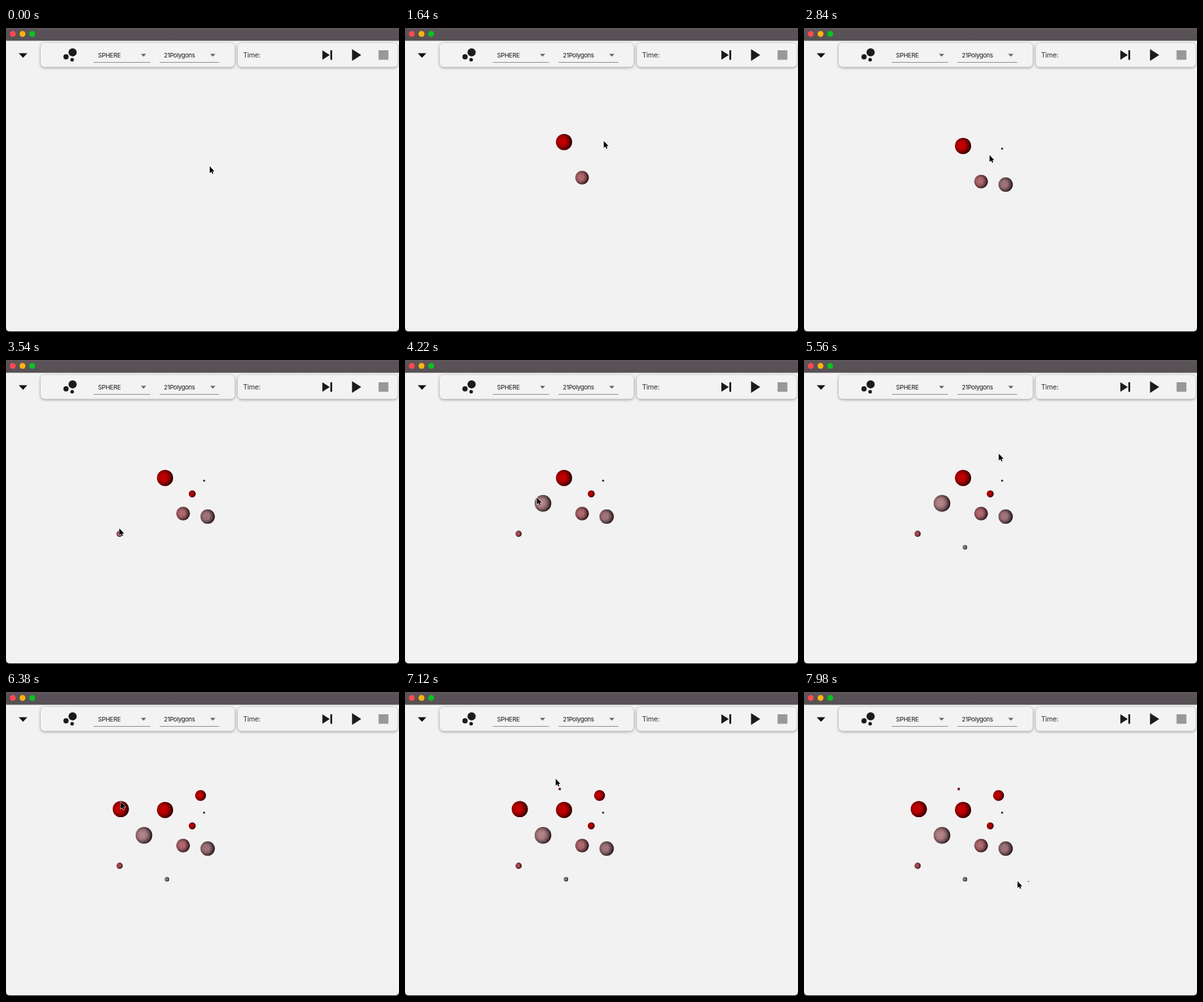
An HTML page for the animation above (8 s loop, 600 by 464 pixels).

```html
<!DOCTYPE html>
<html lang="en">
<head>
<meta charset="utf-8">
<title>Sphere editor</title>
<style>
  html, body { margin: 0; width: 100%; height: 100%; overflow: hidden; background: #161416; }
  svg { display: block; width: 600px; height: 464px; }
  text { font-family: Inter, Roboto, sans-serif; font-size: 9.4px; letter-spacing: -.3px; fill: #161616; }
  .panel { fill: #f3f3f3; filter: drop-shadow(0 1px 2px #0006); }
</style>
</head>
<body>
<svg viewBox="0 0 600 464">
  <defs>
    <radialGradient id="shade" cx=".4" cy=".47" r=".62">
      <stop offset="0" stop-color="#000" stop-opacity="0"/>
      <stop offset=".4" stop-color="#000" stop-opacity=".08"/>
      <stop offset=".72" stop-color="#000" stop-opacity=".45"/>
      <stop offset="1" stop-color="#000" stop-opacity=".95"/>
    </radialGradient>
    <linearGradient id="bar" x2="0" y2="1">
      <stop offset="0" stop-color="#625b60"/>
      <stop offset=".12" stop-color="#5a5358"/>
      <stop offset="1" stop-color="#565054"/>
    </linearGradient>
  </defs>

  <path d="M0 0H600V457Q600 463 594 463H6Q0 463 0 457Z" fill="#f2f2f2"/>
  <rect width="600" height="19.5" fill="url(#bar)"/>
  <circle cx="10.3" cy="9" r="4.5" fill="#ff4b4b"/>
  <circle cx="25.2" cy="9" r="4.5" fill="#fdb40b"/>
  <circle cx="40" cy="9" r="4.5" fill="#0ac220"/>

  <path d="M19.5 38.5H32.5L26 45.5Z" fill="#111"/>
  <rect class="panel" x="53" y="23" width="296" height="36.5" rx="6"/>
  <rect class="panel" x="354" y="23" width="244" height="36.5" rx="6"/>

  <g fill="#1b1b1b">
    <circle cx="101.7" cy="37.2" r="6.2"/>
    <circle cx="91.6" cy="44" r="4"/>
    <circle cx="101" cy="48.4" r="2.7"/>
    <path d="M483 34L494.3 41.2L483 48.4ZM495.2 34H498V48.4H495.2Z"/>
    <path d="M528.3 32.2L542.3 41.2L528.3 50.2Z"/>
  </g>
  <rect x="568.8" y="34" width="15" height="14.5" fill="#989898"/>
  <path d="M134 52.5H220M234.5 52.5H325.5" stroke="#8c8c8c"/>
  <path d="M206 39.5H214L210 43.8ZM311.7 39.5H319.7L315.7 43.8Z" fill="#666"/>
  <text x="140.5" y="45">SPHERE</text>
  <text x="241" y="45">21Polygons</text>
  <text x="362" y="45.3" style="font-size:10.6px;fill:#333">Time:</text>

  <g id="spheres"></g>
  <path id="cursor" d="M0 0V10.4L2.4 8.3L4 11.8L5.6 11L4.1 7.7H7.3Z"
        fill="#000" stroke="#fff" stroke-width="1.1" paint-order="stroke" stroke-linejoin="round"/>
</svg>

<script>
const LOOP = 8000;
const SETTLE = 1720; // the first two spheres drop when the third one arrives
const DROP = 6;

// time of appearance, centre, radius, colour
const spheres = [
  [860, 242.8, 180, 12.3, '#cc0000'],
  [1300, 270.3, 234.3, 10.4, '#bd7077'],
  [1720, 302.4, 184.2, 1.4, '#333333'],
  [2240, 307.8, 239, 10.9, '#ab7d84'],
  [2900, 284.3, 204.2, 5.2, '#d00000'],
  [3480, 173.4, 265.2, 4.7, '#c25a65'],
  [4060, 210.6, 218.8, 12.7, '#bd8b91'],
  [4820, 245.7, 285.9, 3.3, '#85858c'],
  [5620, 297, 158, 8.3, '#d00000'],
  [6320, 175.2, 178.8, 12.3, '#cc0000'],
  [7080, 236.2, 148, 1.9, '#a81c1c'],
  [7800, 342.6, 289.2, .8, '#444444'],
].map(([time, x, y, r, color]) => ({ time, x, y, node: makeSphere(r, color) }));

// pointer stops: arrive, leave, x, y
const stops = [
  [0, 300, 311, 211],
  [780, 920, 243, 164],
  [1220, 1340, 270, 218],
  [1600, 1760, 303.5, 172.5],
  [2160, 2320, 308, 229],
  [2720, 2920, 283.3, 194],
  [3400, 3560, 173, 257],
  [4000, 4240, 201.5, 210],
  [4720, 4980, 246, 283],
  [5480, 5660, 297.4, 143],
  [6160, 6360, 175, 168],
  [6960, 7160, 230, 132.5],
  [7720, 7840, 341, 279],
  [7970, LOOP, 326, 288.7],
];

function makeSvg(tag, attributes, parent) {
  const node = document.createElementNS('http://www.w3.org/2000/svg', tag);
  for (const key in attributes) node.setAttribute(key, attributes[key]);
  parent.append(node);
  return node;
}

function makeSphere(r, color) {
  const group = makeSvg('g', {}, document.getElementById('spheres'));
  makeSvg('circle', { r, fill: color }, group);
  if (r > 4) {
    let d = '';
    for (let row = -.75; row < .8; row += .25) {
      const half = Math.sqrt(1 - row * row) * .85 * r;
      d += `M${-half} ${row * r + 1}Q0 ${row * r} ${half} ${row * r - 1}`;
    }
    makeSvg('path', {
      d, fill: 'none', stroke: '#300', 'stroke-opacity': .28,
      'stroke-width': .7, 'stroke-dasharray': '5 1.5 3 2',
    }, group);
  }
  makeSvg('circle', { r, fill: 'url(#shade)' }, group);
  return group;
}

function pointerAt(t) {
  const next = stops.findIndex(([arrive]) => arrive > t);
  if (next < 0) return stops.at(-1).slice(2);
  const [, leave, x0, y0] = stops[next - 1];
  const [arrive, , x1, y1] = stops[next];
  const p = Math.max(0, (t - leave) / (arrive - leave));
  const eased = p * p * (3 - 2 * p);
  return [x0 + (x1 - x0) * eased, y0 + (y1 - y0) * eased];
}

const cursor = document.getElementById('cursor');

function draw(now) {
  const t = now % LOOP;
  const lift = t < SETTLE ? DROP : 0;
  for (const { time, x, y, node } of spheres) {
    node.setAttribute('visibility', t >= time ? 'visible' : 'hidden');
    node.setAttribute('transform', `translate(${x} ${y - lift})`);
  }
  cursor.setAttribute('transform', `translate(${pointerAt(t)})`);
}

const start = performance.now();
function tick() {
  draw(performance.now() - start);
  requestAnimationFrame(tick);
}
tick();
</script>
</body>
</html>
```
